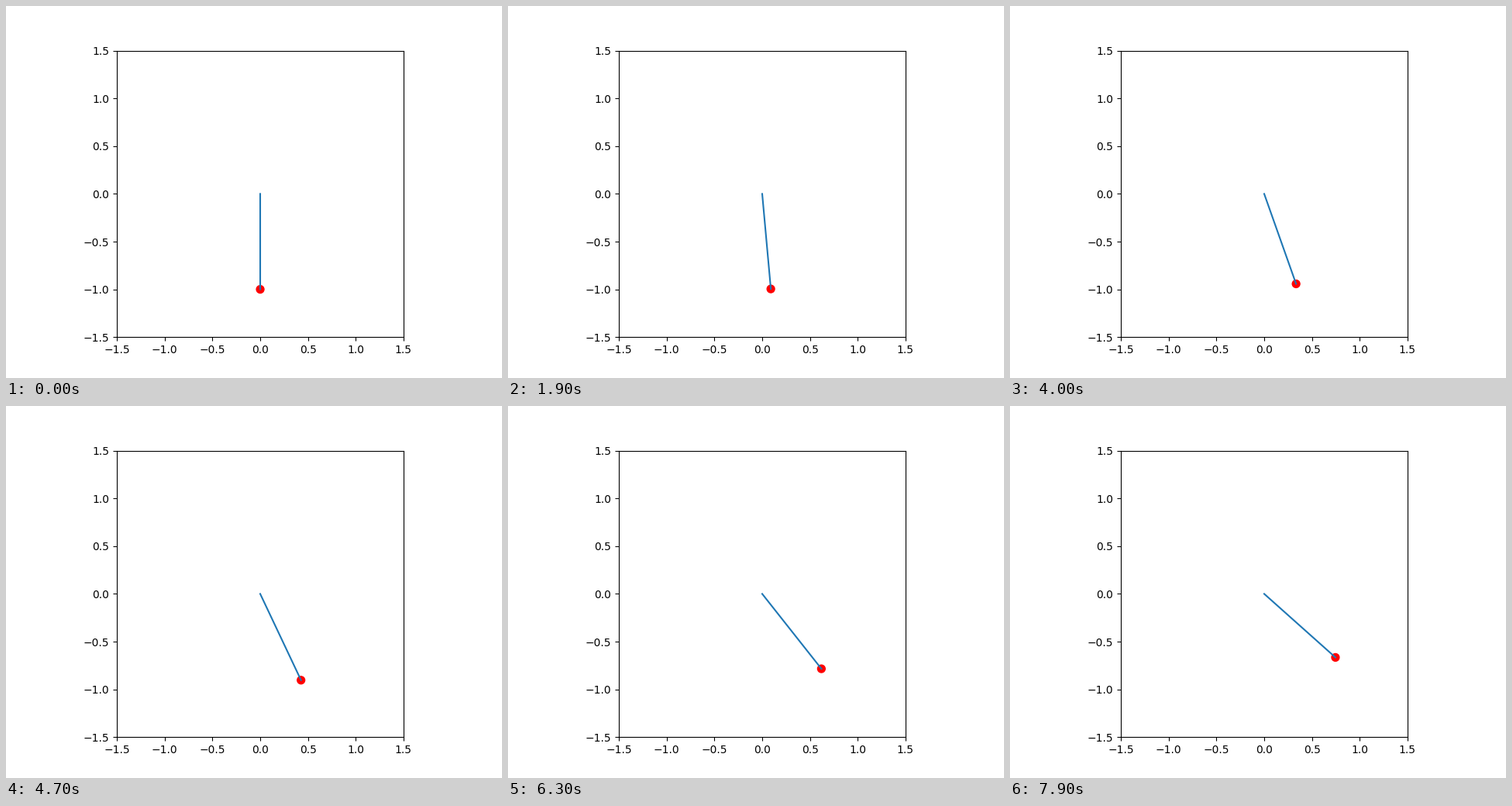
A matplotlib script that plays this animation: 640x480 px, repeating every 8 s.

```python
import numpy as np
import matplotlib.pyplot as plt
from matplotlib.animation import FuncAnimation
from matplotlib.patches import Circle

FRAMES, INTERVAL = 80, 100
LENGTH = 1.0
REST_ANGLE = 0.46   # angle the constant torque would hold
OMEGA = 0.319       # rad per second
LEAD = 0.1          # seconds already elapsed when the loop starts

fig, ax = plt.subplots(figsize=(6.4, 4.8), dpi=100)
ax.set_aspect("equal")
ax.set(xlim=(-1.5, 1.5), ylim=(-1.5, 1.5))
ticks = np.arange(-1.5, 1.6, 0.5)
ax.set_xticks(ticks)
ax.set_yticks(ticks)

rod, = ax.plot([], [], color="C0", lw=1.5)
bob = ax.add_patch(Circle((0, -LENGTH), 0.04, color="red"))


def angle(t):
    """Swing from rest under a constant torque."""
    return REST_ANGLE * (1 - np.cos(OMEGA * (t + LEAD)))


def update(i):
    theta = angle(i * INTERVAL / 1000)
    x, y = LENGTH * np.sin(theta), -LENGTH * np.cos(theta)
    rod.set_data([0, x], [0, y])
    bob.center = (x, y)
    return rod, bob


anim = FuncAnimation(fig, update, frames=FRAMES, interval=INTERVAL,
                     repeat=True, repeat_delay=0)
plt.show()
```
